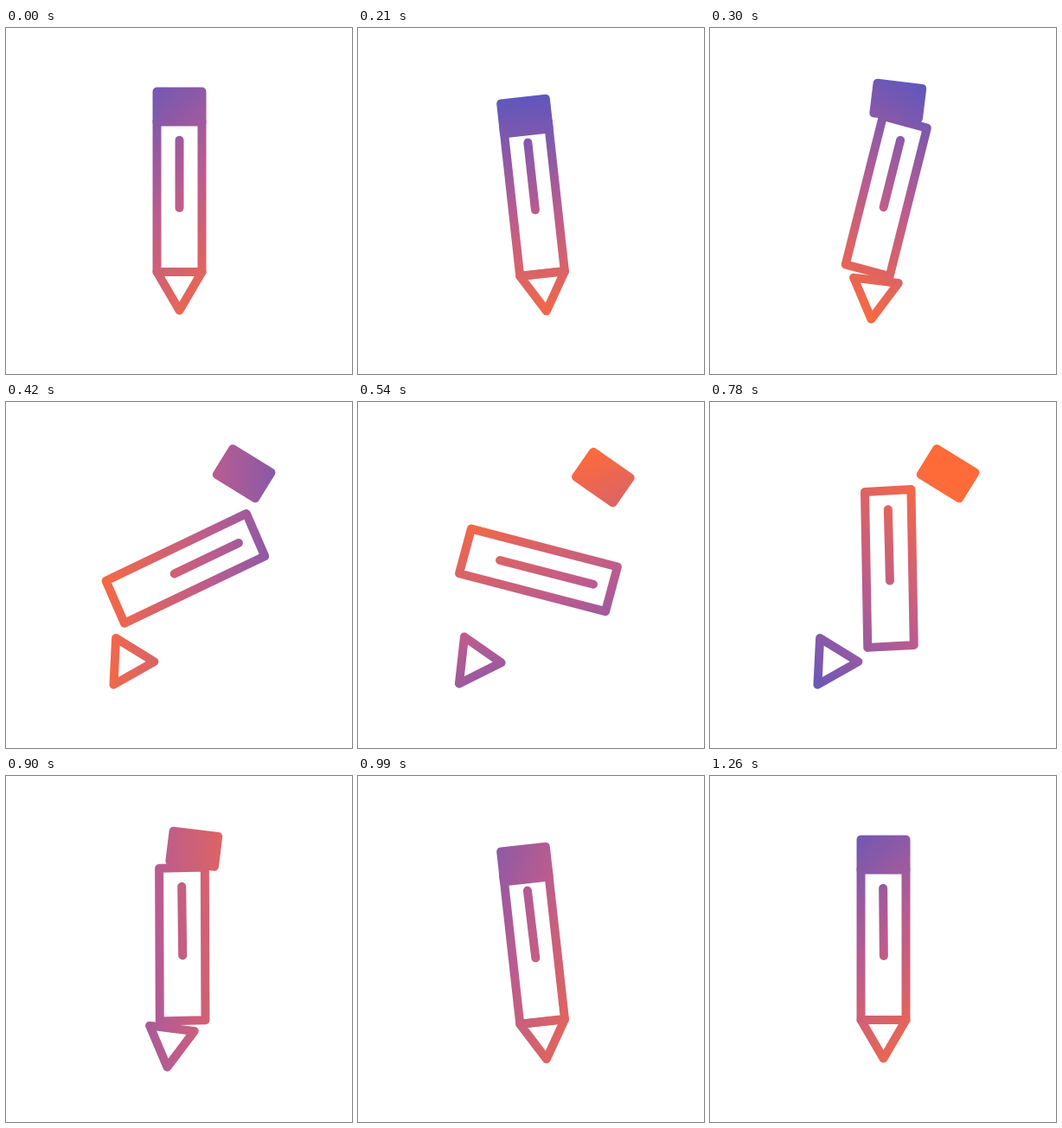
Animation, 400 px wide and 400 px high, one loop 3320 ms. Source, as an HTML page:

```html
<!DOCTYPE html>
<html lang="en">
<head>
<meta charset="utf-8">
<title>Pencil</title>
<style>
  html, body { margin: 0; width: 100%; height: 100%; overflow: hidden; background: #fff; }
  svg { display: block; width: 100%; height: 100%; }
</style>
</head>
<body>
<svg viewBox="0 0 400 400">
  <defs>
    <linearGradient id="ink" gradientUnits="userSpaceOnUse">
      <stop offset="0" stop-color="#5856c1"/>
      <stop offset=".5" stop-color="#ba5c8f"/>
      <stop offset="1" stop-color="#ff6b38"/>
    </linearGradient>
  </defs>
  <g fill="none" stroke="url(#ink)" stroke-width="10" stroke-linejoin="round" stroke-linecap="round">
    <path id="body"/>
    <path id="groove"/>
    <path id="tip"/>
    <path id="eraser" fill="url(#ink)"/>
  </g>
</svg>
<script>
const LOOP = 3320, STEP = 30, LAST = 1260, MIRROR = 1200;
const $ = id => document.getElementById(id);
const RAD = Math.PI / 180;

const smooth = (from, to, t) => {
  const u = Math.min(1, Math.max(0, (t - from) / (to - from)));
  return u * u * (3 - 2 * u);
};
const mix = (a, b, u) => a + (b - a) * u;

// Eased steps between [time, value] keys, at rest on every key.
function track(keys, t) {
  let v = keys[0][1];
  for (let i = 1; i < keys.length; i++) {
    v += (keys[i][1] - keys[i - 1][1]) * smooth(keys[i - 1][0], keys[i][0], t);
  }
  return v;
}

// Flowing curve through [time, value] keys, at rest only at both ends.
function curve(keys, t) {
  const n = keys.length - 1;
  let i = 0;
  while (i < n - 1 && t > keys[i + 1][0]) i++;
  const slope = k => k === 0 || k === n ? 0 :
    (keys[k + 1][1] - keys[k - 1][1]) / (keys[k + 1][0] - keys[k - 1][0]);
  const [t0, v0] = keys[i], [t1, v1] = keys[i + 1];
  const d = t1 - t0, u = Math.min(1, (t - t0) / d), w = 1 - u;
  return v0 * w * w * (1 + 2 * u) + v1 * u * u * (3 - 2 * u) +
    d * u * w * (slope(i) * w - slope(i + 1) * u);
}

function rotate([x, y], deg) {
  const c = Math.cos(deg * RAD), s = Math.sin(deg * RAD);
  return [x * c - y * s, x * s + y * c];
}

const draw = (id, points, close) => $(id).setAttribute('d',
  'M' + points.map(p => p.map(v => v.toFixed(2)).join(' ')).join('L') + (close ? 'Z' : ''));

const box = (w, h) => [[-w, -h], [w, -h], [w, h], [-w, h]].map(p => p.map(v => v / 2));

const TILT = [[0, 0], [200, -6.5], [460, 34.3], [600, 35.3]];
const SHIFT = [[0, 0.5], [200, 3.8], [410, 2.3], [600, 4.2]];
const ERASER = [[0, -109], [200, -97.9], [410, -139.2], [600, -140.6]];
const TIP = [[0, 82], [200, 85], [410, 100.3], [600, 103.5]];
const TIP_H = [[0, 44.5], [200, 43.3], [410, 47.2], [600, 48]];
const BODY = [[0, -5], [200, -2.1], [410, -10.3], [600, -9.2]];
const LENGTH = [[0, 174], [200, 174], [410, 180], [600, 173]];
const WIDTH = [[0, 52], [200, 52], [410, 53.5]];
const SKEW = [[0, 0], [200, 0], [410, 2.1], [600, 0]];
const HUE_ANGLE = [[0, 45], [210, 85], [420, 180], [540, 246], [780, 318], [990, 380], [1260, 405]];
const HUE_MID = [[0, .52], [210, .45], [420, .63], [540, .63], [780, .59], [990, .54], [1260, .52]];

function render(t) {
  // The parts fly out and come back the same way; only the body keeps turning.
  const m = Math.max(0, Math.min(t, MIRROR - t));
  const at = keys => track(keys, m);
  const tilt = at(TILT), shift = at(SHIFT);
  const place = ([x, y]) => rotate([x + shift, y], tilt).map(v => v + 200);

  const eraserY = at(ERASER);
  draw('eraser', box(52, 35).map(([x, y]) => place([x, y + eraserY])), true);

  const tipY = at(TIP);
  draw('tip', [[-26, tipY], [26, tipY], [0, tipY + at(TIP_H)]].map(place), true);

  const flip = smooth(205, 995, t), bodyY = at(BODY), len = at(LENGTH);
  const skew = Math.tan(at(SKEW) * RAD) * (t < 600 ? 1 : -1);
  const turn = ([x, y]) => {
    const [px, py] = rotate([x, y + x * skew], 180 * flip);
    return place([px, py + bodyY]);
  };
  draw('body', box(at(WIDTH), len).map(turn), true);

  // The groove stretches to the far end, then its near end follows.
  const reach = time => mix(len / 2 - 21.7, 13, smooth(560, 800, time));
  const lean = 0.35 * flip;
  draw('groove', [[-lean, -reach(t)], [lean, reach(MIRROR - t)]].map(turn));

  const angle = curve(HUE_ANGLE, t), slide = (0.5 - curve(HUE_MID, t)) * 294;
  [slide - 147, slide + 147].forEach((d, i) => {
    const [x, y] = rotate([d, 0], angle);
    $('ink').setAttribute('x' + (i + 1), 200 + x);
    $('ink').setAttribute('y' + (i + 1), 200 + y);
  });
}

const start = performance.now();
function tick() {
  const t = (performance.now() - start) % LOOP;
  render(Math.min(LAST, Math.floor(t / STEP) * STEP));
  requestAnimationFrame(tick);
}
tick();
</script>
</body>
</html>
```
